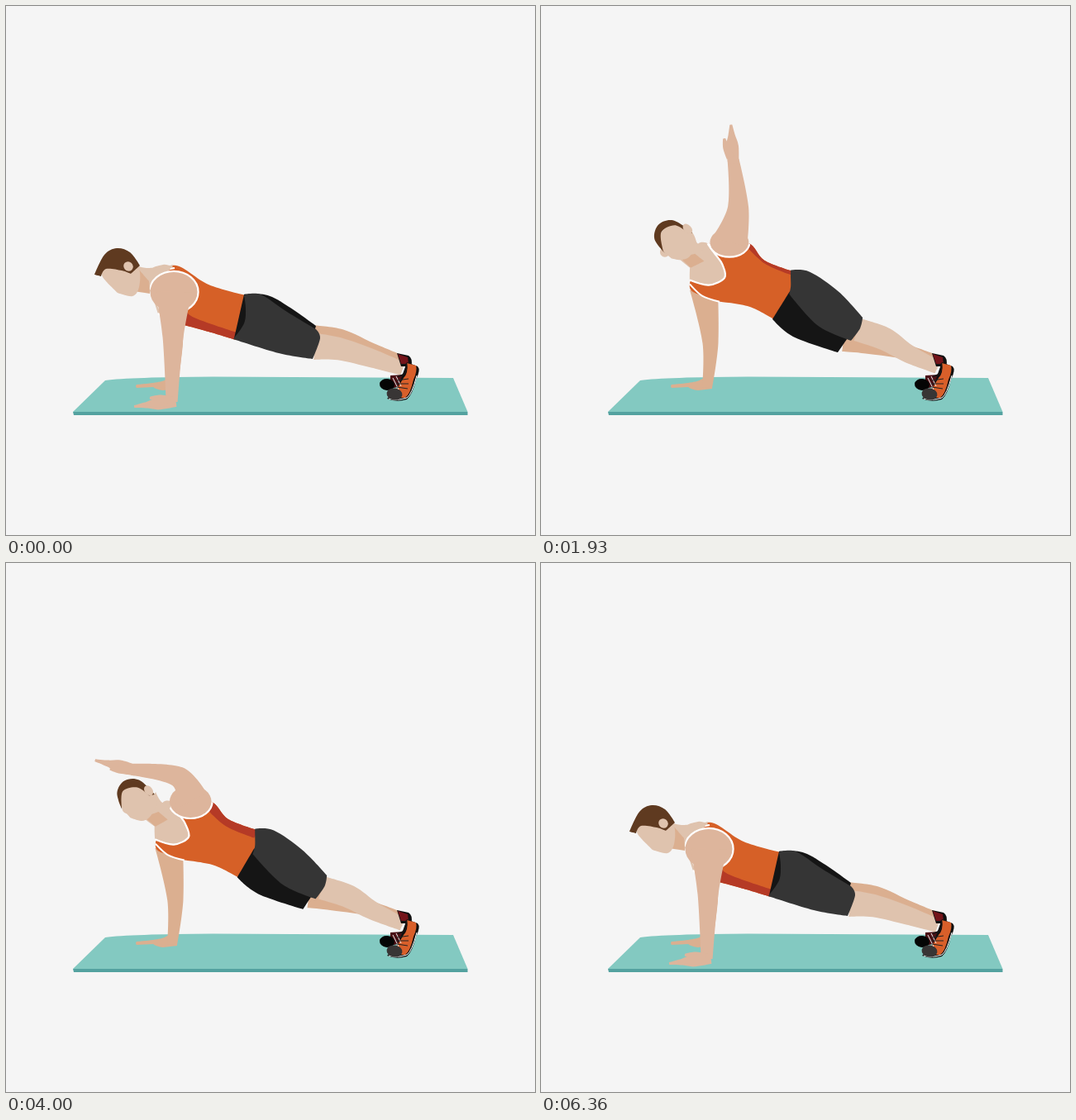
An HTML page with a canvas for the animation above (6.43 s loop, 640 by 640 pixels).

```html
<!DOCTYPE html>
<html lang="en">
<head>
<meta charset="utf-8">
<title>Side plank rotation</title>
<style>
html, body { margin: 0; height: 100%; overflow: hidden; background: #f5f5f5; }
canvas { display: block; width: 100%; height: 100%; }
</style>
</head>
<body>
<canvas width="640" height="640"></canvas>
<script>
const ctx = document.querySelector('canvas').getContext('2d');
const LOOP = 6430;
const SKIN = '#dfc3ae', ARM = '#ddb59c', SHADE = '#dbaf90';

// --- Motion -------------------------------------------------------------

// Stages: 0 plank, 1 hand lifted, 2 arm across, 3 arm up.
const times = [0, 790, 1290, 2640, 4000, 4570, 5290];
const stages = [0, 1, 2, 3, 1.91, 0.89, 0];
const last = times.length - 1;

function hermite(a, b, ma, mb, x) {
  const y = 1 - x;
  return a * y * y * (1 + 2 * x) + b * x * x * (3 - 2 * x) + ma * x * y * y - mb * x * x * y;
}

const speed = i => i % last && i !== 3
  ? (stages[i + 1] - stages[i - 1]) / (times[i + 1] - times[i - 1]) : 0;

function stageAt(t) {
  if (t >= times[last]) return 0;
  const i = times.findIndex(end => t < end) - 1;
  const span = times[i + 1] - times[i];
  const s = hermite(stages[i], stages[i + 1], speed(i) * span, speed(i + 1) * span, (t - times[i]) / span);
  return Math.max(0, Math.min(3, s));
}

// Smooth value through one entry per stage.
function track(values, s) {
  const v = k => values[Math.max(0, Math.min(3, k))];
  const i = Math.min(2, Math.floor(s));
  return hermite(v(i), v(i + 1), (v(i + 1) - v(i - 1)) / 2, (v(i + 2) - v(i)) / 2, s - i);
}

const ROLL = [0, 0.47, 0.97, 1];    // hips and chest
const TURN = [0, 0.25, 0.8, 1];     // head and hand
const STRIPE = [0, 0.57, 0.92, 1];  // side panel of the shirt

// --- Body: plank pose and rolled pose, "!" marks a sharp corner ----------

function shape(...texts) {
  const rows = texts.map(text => text.split(' '));
  const [from, to] = rows.map(row => row.map(p => p.split(',').map(parseFloat)));
  return { from, to, corners: rows[0].map(p => p.endsWith('!')) };
}

const shirt = shape(
  '174,342! 180,325 206,314 245,337 290,350! 294,370 278,404! 245,394 211,385! 205,386 194,384',
  '203,287 212,290 250,287 270,308 304,321 304,345 283,380 252,364 216,358 195,351 180,337');
const nearShorts = shape(
  '288,350! 308,349 340,370 375,391! 380,402 371,427! 330,420 275,403! 288,384 290,366',
  '302,320 325,322 360,346 389,377 386,390 375,405 335,387 300,349 302,340 302,330');
const farShorts = shape(
  '288,349! 322,352 375,387! 367,415! 310,407 276,402!',
  '301,345 340,370 372,400 359,419 305,400 280,379');
const chest = shape(
  '184,372! 203,382 205,370 178,346 174,342 182,324 204,317! 190,313 172,325',
  '180,332 203,338 222,329 219,313 213,304 207,296 201,287 190,288 181,310');
const neck = shape(
  '150,310! 170,317 203,313! 174,346! 155,345!',
  '183,275 190,288 202,287 180,317 165,305');
const neckShade = shape(
  '160,318! 173,333! 174,348! 155,345!',
  '186,300 197,309 181,317 168,305');
const face = shape(
  '118,318! 117,328 135,347! 153,351 161,340 161,318 148,303 130,303',
  '145,277 144,291 160,306 172,307 182,302 189,285 177,267 155,266');
const hair = shape(
  '107,325! 119,301 134,293 150,298 162,314! 151,324! 140,320 121,318 115,327!',
  '153,301 138,284 142,266 160,260 184,274 179,274 162,265 146,275 150,298');

// Limbs run along a centre line: x, y, half width.
const limbs = {
  farArm: [[[200, 360, 14], [203, 408, 11], [201, 462, 6]],
           [[197, 342, 17], [205, 408, 9.5], [201, 462, 6]]],
  farLeg: [[[370, 396, 10], [405, 402, 11], [445, 418, 9], [477, 430, 8]],
           [[366, 405, 13], [390, 408, 12], [440, 418, 9], [477, 430, 8]]],
  nearLeg: [[[374, 412, 16], [404, 415, 13.5], [445, 427, 11], [480, 439, 8]],
            [[383, 392, 14], [416, 403, 14], [445, 421, 11], [480, 437, 8]]],
  stripe: [[[212, 376, 13], [224, 382, 6], [278, 400, 5]],
           [[252, 284, 6], [275, 306, 6], [305, 320, 5]]]
};

// Moving arm: shoulder position, then length and angle of each bone by stage.
const arm = {
  x: [203, 213, 224, 229], y: [346, 316, 287, 287],
  bones: [
    { length: [55, 63, 33, 51], angle: [91, 127, 251, 292] },
    { length: [78, 39, 57, 57], angle: [91, 131, 196, 291] },
    { length: [46, 43, 46, 40], angle: [173, 158, 200, 294] }
  ]
};

// --- Drawing helpers ------------------------------------------------------

const mix = (a, b, k) => a + (b - a) * k;
const mixPoints = (from, to, k) => from.map((p, j) => p.map((v, axis) => mix(v, to[j][axis], k)));

function pointsAt({ from, to, corners }, k) {
  return mixPoints(from, to, k).map((p, j) => Object.assign(p, { corner: corners[j] }));
}

function curve(pts, closed = true) {
  const n = pts.length, path = new Path2D();
  const at = i => closed ? pts[(i + n) % n] : pts[Math.max(0, Math.min(n - 1, i))];
  const handle = (i, dir) => {
    const k = at(i).corner ? 0 : dir / 6;
    return at(i).map((v, axis) => v + (at(i + 1)[axis] - at(i - 1)[axis]) * k);
  };
  path.moveTo(...pts[0]);
  for (let i = 0; i < (closed ? n : n - 1); i++)
    path.bezierCurveTo(...handle(i, 1), ...handle(i + 1, -1), ...at(i + 1));
  return path;
}

function limb(line) {
  const end = line.length - 1;
  const side = sign => line.map(([x, y, w], i) => {
    const a = line[Math.max(0, i - 1)], b = line[Math.min(end, i + 1)];
    const dx = b[0] - a[0], dy = b[1] - a[1], k = sign * w / Math.hypot(dx, dy);
    return Object.assign([x - dy * k, y + dx * k], { corner: i % end === 0 });
  });
  return curve([...side(1), ...side(-1).reverse()]);
}

function oval(x, y, rx, ry, tilt = 0) {
  const path = new Path2D();
  path.ellipse(x, y, rx, ry, tilt, 0, 7);
  return path;
}

const toPath = path => typeof path === 'string' ? new Path2D(path) : path;

function fill(path, color) {
  ctx.fillStyle = color;
  ctx.fill(toPath(path));
}

function stroke(path, color, width) {
  ctx.strokeStyle = color;
  ctx.lineWidth = width;
  ctx.stroke(toPath(path));
}

function inside(path, paint) {
  ctx.save();
  ctx.clip(path);
  paint();
  ctx.restore();
}

// --- Scene ----------------------------------------------------------------

function drawMat() {
  fill('M81 491L120 453Q150 449 250 448.5L541 450L558.5 491Z', '#83c9c1');
  fill('M81 491H558.5V495H82Z', '#54a2a0');
}

function drawShoes() {
  fill('M473 420L487 423Q493 427 490 436L478 436Z', '#101010');
  fill('M474 421L486 425L487 433L478 433Z', '#74141a');
  fill('M465 447L481 446L478 460L465 463Z', '#4a1015');
  fill(oval(461, 458, 9, 7, 0.1), '#050505');
  fill('M485 431L498 436Q502 440 496 452Q492 470 485 476Q472 480 461 475L474 462Z', '#101010');
  stroke('M497 447Q491 470 485 474Q473 478 463 475', '#fff', 1);
  fill('M485 432L496 435Q498 441 493 452Q489 470 483 474L474 474L473 463L481 450Q487 444 485 432Z', '#d85f2a');
  fill(oval(470, 469.5, 9.5, 7, 0.15), '#383535');
  stroke('M474 448Q486 447 484.5 432', '#181414', 1.6);
  stroke('M468 450L475 464M472 448L478 460', '#eee', 1);
  stroke('M473 453L487 451M472 457L487 457M473 461L486 463', '#222', 1);
}

function drawHead(roll, turn) {
  const lag = roll - turn;
  const x = mix(137, 166, turn), y = mix(320, 284, turn);
  ctx.save();
  ctx.translate(x, y - 36 * lag);
  ctx.rotate(0.8 * lag);
  ctx.translate(-x, -y);
  fill(oval(mix(140, 151, turn), mix(326, 299, turn), 6, 6), SKIN);
  fill(curve(pointsAt(face, turn)), SKIN);
  fill(curve(pointsAt(hair, turn)), '#5f3a20');
  fill(oval(mix(148, 178, turn), mix(315, 269, turn), mix(5.5, 4.5, turn), mix(6, 7, turn), -0.8), SKIN);
  ctx.restore();
}

function drawArm(s, turn, shirtPath) {
  const joints = [[track(arm.x, s), track(arm.y, s)]];
  const bones = arm.bones.map(bone => {
    const length = track(bone.length, s), angle = track(bone.angle, s) * Math.PI / 180;
    const [x, y] = joints[joints.length - 1];
    joints.push([x + length * Math.cos(angle), y + length * Math.sin(angle)]);
    return { length, angle };
  });
  const [shoulder, elbow, wrist] = joints;
  const { length, angle } = bones[2];
  const inHand = (along, across, w) => [
    wrist[0] + along * Math.cos(angle) - across * Math.sin(angle),
    wrist[1] + along * Math.sin(angle) + across * Math.cos(angle), w];
  const thumb = mix(8, -10, turn);

  const cap = oval(...shoulder, mix(28.5, 23, turn * turn), mix(24, 16, turn * turn));
  inside(shirtPath, () => stroke(cap, '#fff', 4.4));
  fill(cap, ARM);
  fill(limb([[...shoulder, 22], [...elbow, 12.5], [...wrist, 7]]), ARM);
  fill(limb([inHand(-5, 0, 6.5), inHand(16, 0, 7.5), inHand(30, 0, 4), inHand(length, 0, 1.5)]), ARM);
  fill(limb([inHand(2, thumb * 0.3, 5), inHand(15, thumb * 0.8, 4), inHand(26, thumb, 1.5)]), ARM);
}

function draw(t) {
  const s = stageAt(t);
  const roll = track(ROLL, s), turn = track(TURN, s);
  const paint = (part, color) => fill(curve(pointsAt(part, roll)), color);
  const paintLimb = (name, color, k = roll) => fill(limb(mixPoints(...limbs[name], k)), color);

  fill('M0 0H640V640H0Z', '#f5f5f5');
  drawMat();
  fill('M207 448L195 451C190 455 180 456 158 458Q156 460 158 462L178 461Q182 464 190 465L207 463Z', SHADE);
  paintLimb('farArm', SHADE);
  paintLimb('farLeg', SHADE);
  paintLimb('nearLeg', SKIN);
  drawShoes();

  const shirtPoints = pointsAt(shirt, roll);
  const shirtPath = curve(shirtPoints);
  fill(shirtPath, '#d66027');
  inside(shirtPath, () => paintLimb('stripe', '#b53a26', track(STRIPE, s)));
  stroke(curve(shirtPoints.slice(8), false), '#fff', 2);
  paint(farShorts, '#151515');
  paint(nearShorts, '#353535');

  paint(chest, SKIN);
  stroke(curve(pointsAt(chest, roll).slice(0, 7), false), '#fff', 2.2);
  paint(neck, SKIN);
  paint(neckShade, SHADE);
  drawHead(roll, turn);
  drawArm(s, turn, shirtPath);
}

function tick() {
  draw(performance.now() % LOOP);
  requestAnimationFrame(tick);
}
tick();
</script>
</body>
</html>
```
